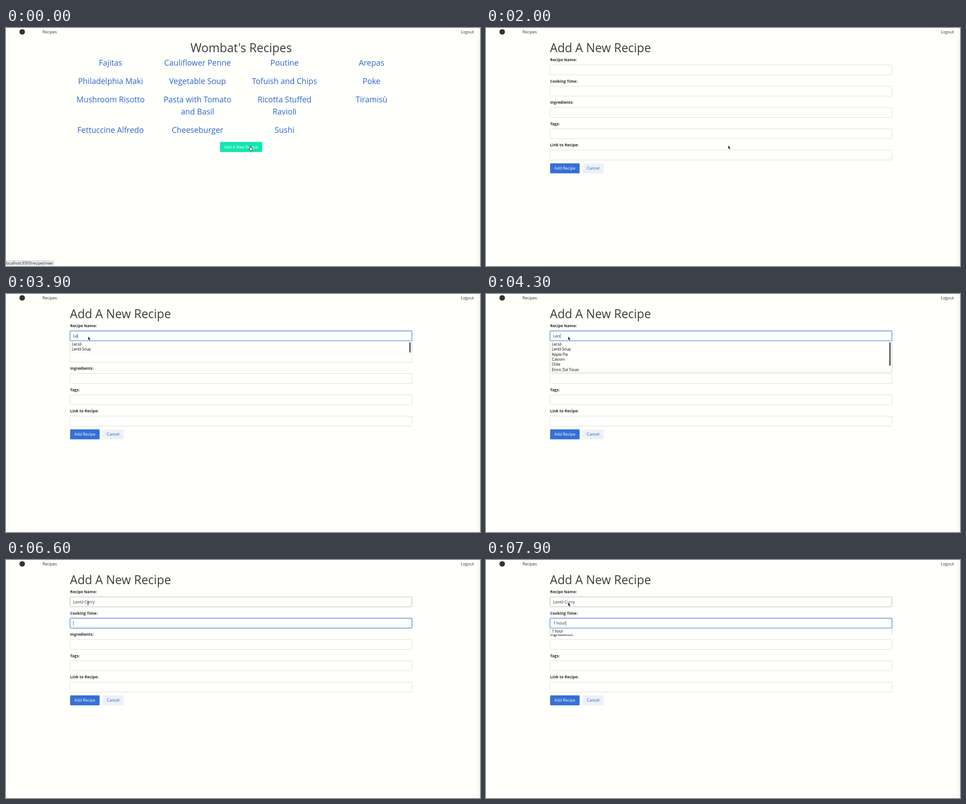
These frames come from a looping animation (1055 px wide and 531 px high, 8 s). An HTML page:

```html
<!DOCTYPE html>
<html lang="en">
<head>
<meta charset="utf-8">
<title>Recipes</title>
<style>
  html, body { margin: 0; width: 100%; height: 100%; overflow: hidden; background: #fffffc; }
  body > svg { display: block; width: 100%; height: 100%; }
  text { font: 8.95px "Open Sans", "Noto Sans", sans-serif; fill: #2e2e2e; white-space: pre; }
  .title { font-size: 26.7px; fill: #3c3c3c; }
  .recipe { font-size: 17.55px; fill: #2f66c8; }
  .label { font-size: 8.7px; font-weight: 700; fill: #2b2b2b; }
  .option { font-size: 8.2px; fill: #000; }
  .status { font-size: 8.15px; fill: #222; }
  .mid { text-anchor: middle; }
  .light { fill: #fff; }
  .link { fill: #2358b3; }
</style>
</head>
<body>
<svg id="stage" viewBox="0 0 1055 531"></svg>
<script>
const PITCH = 47.5, ROW = 11.35, LEFT = 142.5, WIDTH = 761;
const stage = document.getElementById('stage');
const byId = id => document.getElementById(id);

const text = (x, y, content, cls = '', id = '') =>
  `<text x="${x}" y="${y}" class="${cls}" id="${id}">${content}</text>`;
const rect = (x, y, w, h, fill, extra = '') =>
  `<rect x="${x}" y="${y}" width="${w}" height="${h}" fill="${fill}" ${extra}/>`;

const columns = [
  [['Fajitas', 0], ['Philadelphia Maki', 41], ['Mushroom Risotto', 82], ['Fettuccine Alfredo', 150]],
  [['Cauliflower Penne', 0], ['Vegetable Soup', 41], ['Pasta with Tomato', 82], ['and Basil', 109], ['Cheeseburger', 150]],
  [['Poutine', 0], ['Tofuish and Chips', 41], ['Ricotta Stuffed', 82], ['Ravioli', 109], ['Sushi', 150]],
  [['Arepas', 0], ['Poke', 41], ['Tiramisù', 82]]
];
const labels = ['Recipe Name:', 'Cooking Time:', 'Ingredients:', 'Tags:', 'Link to Recipe:'];
const fieldTop = i => 82.4 + PITCH * i;

const listPage = `<g id="listPage">
  ${text(523.5, 53.5, "Wombat's Recipes", 'title mid')}
  ${columns.map((names, c) => names.map(([name, dy]) =>
    text(232.7 + 193.6 * c, 84.2 + dy, name, 'recipe mid')).join('')).join('')}
  ${rect(475.5, 253.5, 95.5, 24, '#b9f6e5', 'rx="2.5" id="ring"')}
  ${rect(476.3, 254.2, 93.9, 22.5, '#12e6b0', 'rx="2"')}
  ${text(523.3, 268.8, 'Add A New Recipe', 'mid light')}
  <path d="M-1 519.5H104.5Q106.5 519.5 106.5 521.5V532H-1Z" fill="#f2f2f0" stroke="#bcbcba"/>
  ${text(0, 528.4, 'localhost:9393/recipes/new', 'status')}
</g>`;

const formPage = `<g id="formPage">
  ${text(142.3, 53.5, 'Add A New Recipe', 'title')}
  ${labels.map((label, i) => text(142.7, 74.2 + PITCH * i, label, 'label')
    + rect(LEFT, fieldTop(i), WIDTH, 22.1, '#fffffd', `rx="2" stroke="#dbdbd9" id="field${i}"`)).join('')}
  ${rect(LEFT, 0, WIDTH, 22.1, 'none', 'rx="2" stroke="#3870d0" stroke-opacity=".22" stroke-width="2.6" id="glow"')}
  ${rect(LEFT, 0, WIDTH, 22.1, 'none', 'rx="2" stroke="#5585d2" id="focus"')}
  ${text(149.4, 96.7, '', '', 'value0')}
  ${text(149.4, 96.7 + PITCH, '', '', 'value1')}
  ${rect(0, 0, .8, 10.5, '#333', 'id="caret"')}
  ${rect(142.7, 302, 65.7, 22.2, '#3670d4', 'rx="2"')}
  ${text(175.5, 316.3, 'Add Recipe', 'mid light')}
  ${rect(215, 302, 46.8, 22.2, '#ecf1f9', 'rx="2"')}
  ${text(238.4, 316.3, 'Cancel', 'mid link')}
  <svg id="menu" x="142" width="762"></svg>
</g>`;

const cursors = `<g id="cursor" stroke-linejoin="round">
  <path id="arrow" d="M0 0V8L1.9 6.3 3.3 9.3 4.7 8.6 3.3 5.8H5.6Z" fill="#111" stroke="#fff" stroke-width=".5"/>
  <path id="hand" d="M-1 1Q0-.8 1 1V4.2Q4 4 5 5.6V8L4.2 10.6H-.2L-3 6.6Q-2.6 5-1 6.6Z" fill="#fff" stroke="#111" stroke-width=".9"/>
  <path id="beam" d="M-1.8-4H-.5L0-3.5 .5-4H1.8M0-3.5V3.5M-1.8 4H-.5L0 3.5 .5 4H1.8" fill="none" stroke="#222" stroke-width=".9"/>
</g>`;

stage.innerHTML = rect(0, 0, 1055, 531, '#fffffc')
  + rect(1049, 0, 6, 531, '#f7f7f5')
  + '<circle cx="36" cy="8.7" r="6.2" fill="#333"/>'
  + text(81.5, 11.9, 'Recipes') + text(1012.3, 11.9, 'Logout')
  + listPage + formPage + cursors;

// Each track lists [start time, ...state]; a state holds until the next one.
const pointer = [
  [0, 'hand', 543.8, 263], [500, 'hand', 547, 264], [600, 'hand', 552, 265], [700, 'hand', 555.5, 265.5],
  [1100, 'arrow', 539, 262], [2300, 'arrow', 420, 150], [2400, 'arrow', 262, 56],
  [2500, 'arrow', 226, 70], [2700, 'beam', 188, 92], [2800, 'beam', 182.6, 96],
  [3900, 'arrow', 182.8, 95], [6600, 'beam', 182.6, 96], [7300, 'arrow', 182.8, 95]
];
const nameTyping = [
  [0, ''], [3700, 'L'], [3900, 'Le'], [4300, 'Len'], [4500, 'Lent'], [5000, 'Lentil'], [5300, 'Lentil '],
  [5500, 'Lentil C'], [5700, 'Lentil Cu'], [5900, 'Lentil Cur'], [6100, 'Lentil Curry']
];
const timeTyping = [
  [0, ''], [7300, '1'], [7500, '1 '], [7600, '1 h'], [7700, '1 ho'], [7800, '1 hou'], [7900, '1 hour']
];
const names = ['Lecsó', 'Lentil Soup', 'Apple Pie', 'Calvorn', 'Chile', 'Emric Dal Tovan'];
const times = ['1 hour', '10 minutes', '15 minutes', '1.5 hours', '1 day'];
const menus = [
  [0, [], 0], [3900, names, 25], [4000, names, 52], [4100, names, 69.8], [4400, names, 40],
  [4500, ['Lentil Soup'], 13.7], [5000, names, 13.7], [5700, [], 0],
  [7300, times, 25], [7400, times, 59], [7600, times, 36], [7700, ['1 hour'], 13.4]
];
const at = (track, t) => track.findLast(step => step[0] <= t).slice(1);
const show = (id, visible) => byId(id).setAttribute('visibility', visible ? 'inherit' : 'hidden');
const set = (id, attrs) => Object.entries(attrs).forEach(([k, v]) => byId(id).setAttribute(k, v));

function drawMenu(t, field) {
  const [options, height] = at(menus, t);
  show('menu', height > 0);
  set('menu', { y: 105.3 + PITCH * field, height });
  const full = 1.8 + ROW * options.length;
  const bottom = options.length > 1 ? full - .4 : 80;
  byId('menu').innerHTML = rect(.5, -1, 761, bottom + 1, '#fffffd', 'stroke="#c8c8c6"')
    + options.map((option, i) => text(4.5, 9.7 + ROW * i, option, 'option')).join('')
    + (options.length === names.length ? rect(755.3, 2.7, 3.6, 52, '#666', 'rx="1"') : '');
}

function draw(t) {
  const onForm = t >= 1900, focused = t >= 3000, field = t >= 6600 ? 1 : 0;
  show('listPage', !onForm);
  show('formPage', onForm);
  show('ring', t >= 500);

  byId('value0').textContent = at(nameTyping, t)[0];
  byId('value1').textContent = at(timeTyping, t)[0];
  set('field0', { stroke: t >= 2700 ? '#b7b7b5' : '#dbdbd9' });
  for (const id of ['glow', 'focus']) {
    show(id, focused);
    set(id, { y: fieldTop(field) });
  }
  show('caret', focused);
  set('caret', {
    x: 149.6 + byId('value' + field).getComputedTextLength(),
    y: 88.3 + PITCH * field
  });
  drawMenu(t, field);

  const [shape, x, y] = at(pointer, t);
  for (const id of ['arrow', 'hand', 'beam']) show(id, id === shape);
  set('cursor', { transform: `translate(${x} ${y})` });
}

function frame() {
  draw(performance.now() % 8000);
  requestAnimationFrame(frame);
}
frame();
</script>
</body>
</html>
```
